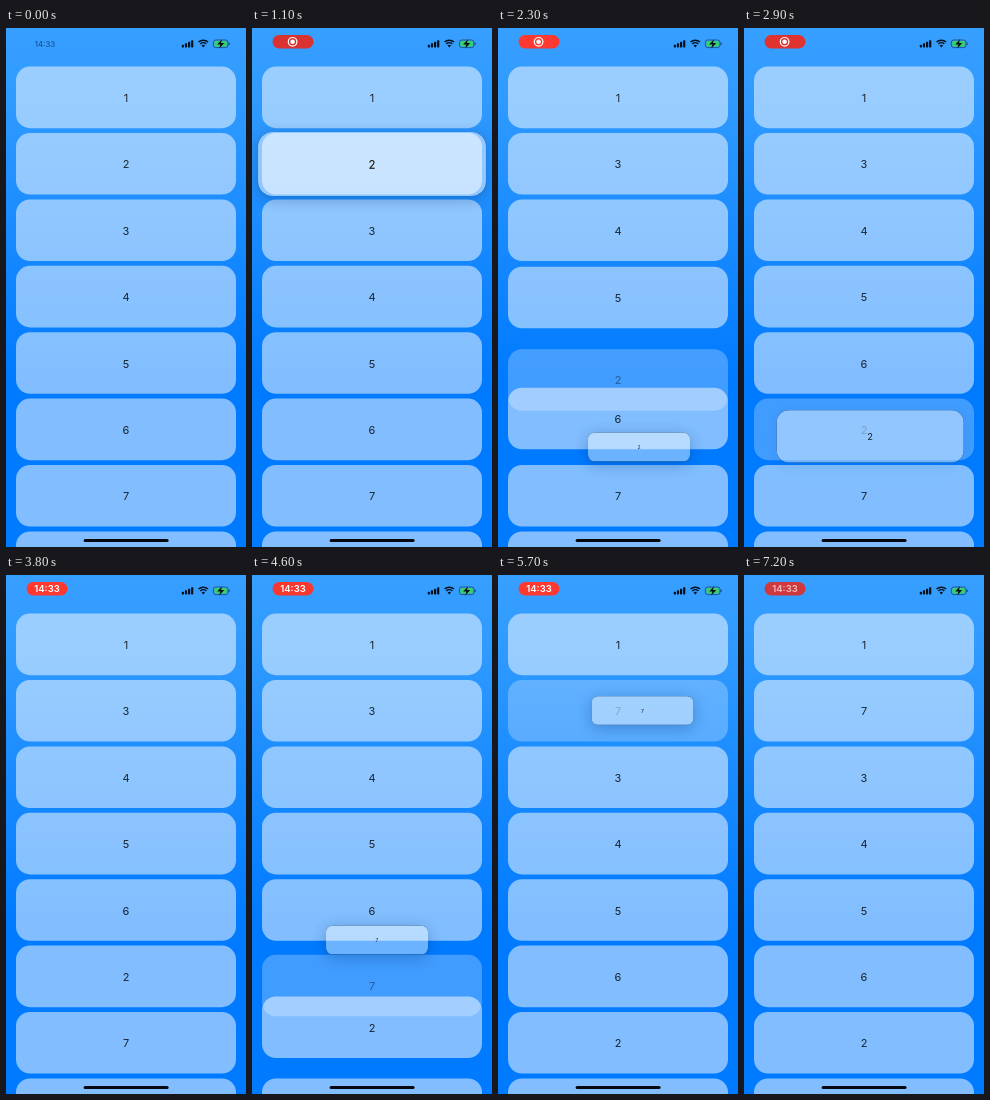
An HTML page with a canvas that plays this animation: 240x519 px, repeating every 7.3 s.

```html
<!DOCTYPE html>
<html lang="en">
<head>
<meta charset="utf-8">
<title>Reorderable list</title>
<style>
html, body { margin: 0; height: 100%; overflow: hidden; background: #007aff; }
canvas { display: block; }
</style>
</head>
<body>
<canvas id="stage" width="240" height="519"></canvas>
<script>
const ctx = document.getElementById('stage').getContext('2d');
const LOOP = 7300, STEP = 100;
const TOP = 38.6, PITCH = 66.4, CARD_W = 220, CARD_H = 61.6, RADIUS = 14;
const SMALL = 0.4636, LIFTED = 1.036;
const SWAP_MS = 350, DRAG_LEAD = 25;

// swaps: [time, passed card]; path: [time, x, y] of the floating card's centre
const drags = [
  { card: 2, lift: 800, go: 1250, drop: 2650, dir: 1,
    swaps: [[1400, 3], [1690, 4], [1978, 5], [2200, 6]],
    path: [[1250, 120, 136], [1420, 124, 171], [1700, 131, 238], [1978, 136, 304],
           [2180, 140, 371], [2300, 141, 419], [2550, 142, 426]] },
  { card: 7, lift: 3850, go: 4250, drop: 5850, dir: -1,
    swaps: [[4370, 2], [4600, 6], [4855, 5], [5040, 4], [5300, 3]],
    path: [[4250, 120, 468], [4370, 121, 432], [4600, 125, 365], [4855, 129, 299],
           [5040, 131, 233], [5100, 131, 220], [5320, 137, 167], [5700, 144.5, 135.5]] }
];

const mix = (a, b, k) => a + (b - a) * k;
const ramp = (t, start, ms) => Math.min(1, Math.max(0, (t - start) / ms));
const ease = (t, start, ms) => {
  const k = ramp(t, start, ms);
  return k < 0.5 ? 2 * k * k : 1 - 2 * (1 - k) ** 2;
};

function along(path, t) {
  let i = 0;
  while (i < path.length - 2 && t > path[i + 1][0]) i++;
  const [a, b] = [path[i], path[i + 1]];
  const k = ramp(t, a[0], b[0] - a[0]);
  return [mix(a[1], b[1], k), mix(a[2], b[2], k)];
}

function slot(card, t) {
  let pos = card - 1;
  for (const { card: dragged, dir, swaps } of drags) {
    for (const [time, passed] of swaps) {
      if (card === dragged) pos += dir * ease(t, time - DRAG_LEAD, SWAP_MS);
      else if (card === passed) pos -= dir * ease(t, time, SWAP_MS);
    }
  }
  return pos;
}

const centreY = (card, t) => TOP + CARD_H / 2 + PITCH * slot(card, t);

function box(x, y, w, h, r, color) {
  ctx.beginPath();
  ctx.roundRect(x, y, w, h, r);
  ctx.fillStyle = color;
  ctx.fill();
}

function label(text, x, y, font, color) {
  ctx.font = font + ' Inter, sans-serif';
  ctx.textAlign = 'center';
  ctx.fillStyle = color;
  ctx.fillText(text, x, y);
}

function drawCard(card, x, y, scale, alpha, white) {
  ctx.save();
  ctx.translate(x, y);
  ctx.scale(scale, scale);
  ctx.globalAlpha = alpha;
  box(-CARD_W / 2, -CARD_H / 2, CARD_W, CARD_H, RADIUS, `rgba(255,255,255,${white})`);
  label(card, 0, 4.5, '11px', 'rgba(0,0,0,.82)');
  ctx.restore();
}

function drawShadow(x, y, scale, alpha) {
  const w = CARD_W * scale, h = CARD_H * scale;
  const shape = [x - w / 2, y - h / 2, w, h, RADIUS * scale];
  ctx.save();
  ctx.beginPath();
  ctx.rect(0, 0, 240, 519);
  ctx.roundRect(...shape);
  ctx.clip('evenodd');
  ctx.shadowColor = `rgba(0,40,110,${0.32 * alpha})`;
  ctx.shadowBlur = 16;
  ctx.shadowOffsetY = 3;
  box(...shape, '#000');
  ctx.restore();
}

function drawFloating(drag, t) {
  const landed = drag.drop + 400;
  if (t < drag.lift || t > landed + 150) return;
  const up = ease(t, drag.lift, 300);
  const shrink = ease(t, drag.go, 300);
  const fall = ease(t, drag.drop, 400);
  const fade = 1 - ramp(t, landed - 50, 200);
  const [px, py] = along(drag.path, t);
  const x = mix(px, 120, fall), y = mix(py, centreY(drag.card, t), fall);
  const scale = mix(mix(mix(1, LIFTED, up), SMALL, shrink), 1, fall);
  drawShadow(x, y, scale, up * (1 - fall));
  drawCard(drag.card, x, y, scale, up * fade, mix(0.5, 0.42, shrink));
}

function cardAlpha(card, t) {
  const drag = drags.find(d => d.card === card);
  if (!drag) return 1;
  return 1 - 0.5 * (ramp(t, drag.go, 200) - ramp(t, drag.drop + 350, 200));
}

function drawPill(t) {
  const shown = ramp(t, 0, 300);
  const ending = ramp(t, 7000, 300);
  if (shown < 1) {
    ctx.globalAlpha = 1 - shown;
    label('14:33', 39, 19, '8px', 'rgba(15,40,95,.75)');
  }
  const pulse = 0.5 - 0.5 * Math.cos((t - 1120) / 1000 * Math.PI);
  const glow = Math.min(1, pulse * 1.5);
  ctx.globalAlpha = shown * (1 - 0.1 * ending);
  box(20.5, 7, 41, 13.4, 6.7, `rgb(${mix(218, 255, glow)},${mix(50, 57, glow)},48)`);
  const clock = ramp(t, 2900, 200);
  ctx.globalAlpha = shown * (1 - clock);
  ctx.strokeStyle = '#fff';
  ctx.lineWidth = 1.2;
  ctx.beginPath();
  ctx.arc(40.6, 13.8, 4.3, 0, 7);
  ctx.stroke();
  box(38.3, 11.5, 4.6, 4.6, 2.3, '#fff');
  ctx.globalAlpha = clock * (1 - 0.5 * ending);
  label('14:33', 41, 17.2, '600 9.5px', '#fff');
  ctx.globalAlpha = 1;
}

function drawStatusIcons() {
  for (let i = 0; i < 4; i++) {
    const h = 2.6 + i * 1.5;
    box(175.8 + i * 3.1, 19.4 - h, 2.2, h, 0.6, '#06101c');
  }

  ctx.strokeStyle = '#06101c';
  ctx.lineWidth = 1.4;
  for (const r of [7, 4.4]) {
    ctx.beginPath();
    ctx.arc(197.3, 19.2, r, -Math.PI * 0.74, -Math.PI * 0.26);
    ctx.stroke();
  }
  ctx.beginPath();
  ctx.moveTo(197.3, 19.4);
  ctx.arc(197.3, 19.2, 2.4, -Math.PI * 0.76, -Math.PI * 0.24);
  ctx.fill();

  ctx.strokeStyle = 'rgba(6,16,28,.6)';
  ctx.lineWidth = 0.8;
  ctx.beginPath();
  ctx.roundRect(207.4, 12, 14.6, 7.6, 2.3);
  ctx.stroke();
  box(222.6, 14.5, 1.1, 2.6, 0.5, 'rgba(6,16,28,.6)');
  box(208.4, 13, 12.4, 5.6, 1.4, '#39cf62');
  ctx.fillStyle = '#06101c';
  ctx.fill(new Path2D('M216 11.2L211.2 16.5H214.3L213.3 20.4L218.2 15H215Z'));
}

const sky = ctx.createLinearGradient(0, 0, 0, 350);
sky.addColorStop(0, '#379fff');
sky.addColorStop(0.2, '#309aff');
sky.addColorStop(1, '#007aff');

function draw(t) {
  ctx.fillStyle = sky;
  ctx.fillRect(0, 0, 240, 519);
  for (let card = 1; card <= 8; card++) {
    drawCard(card, 120, centreY(card, t), 1, cardAlpha(card, t), 0.51);
  }
  drags.forEach(drag => drawFloating(drag, t));
  drawPill(t);
  drawStatusIcons();
  box(77.6, 511, 85, 3, 1.5, '#05080f');
}

const start = performance.now();
function tick() {
  const t = (performance.now() - start) % LOOP;
  draw(Math.floor(t / STEP) * STEP);
  requestAnimationFrame(tick);
}
tick();
</script>
</body>
</html>
```
